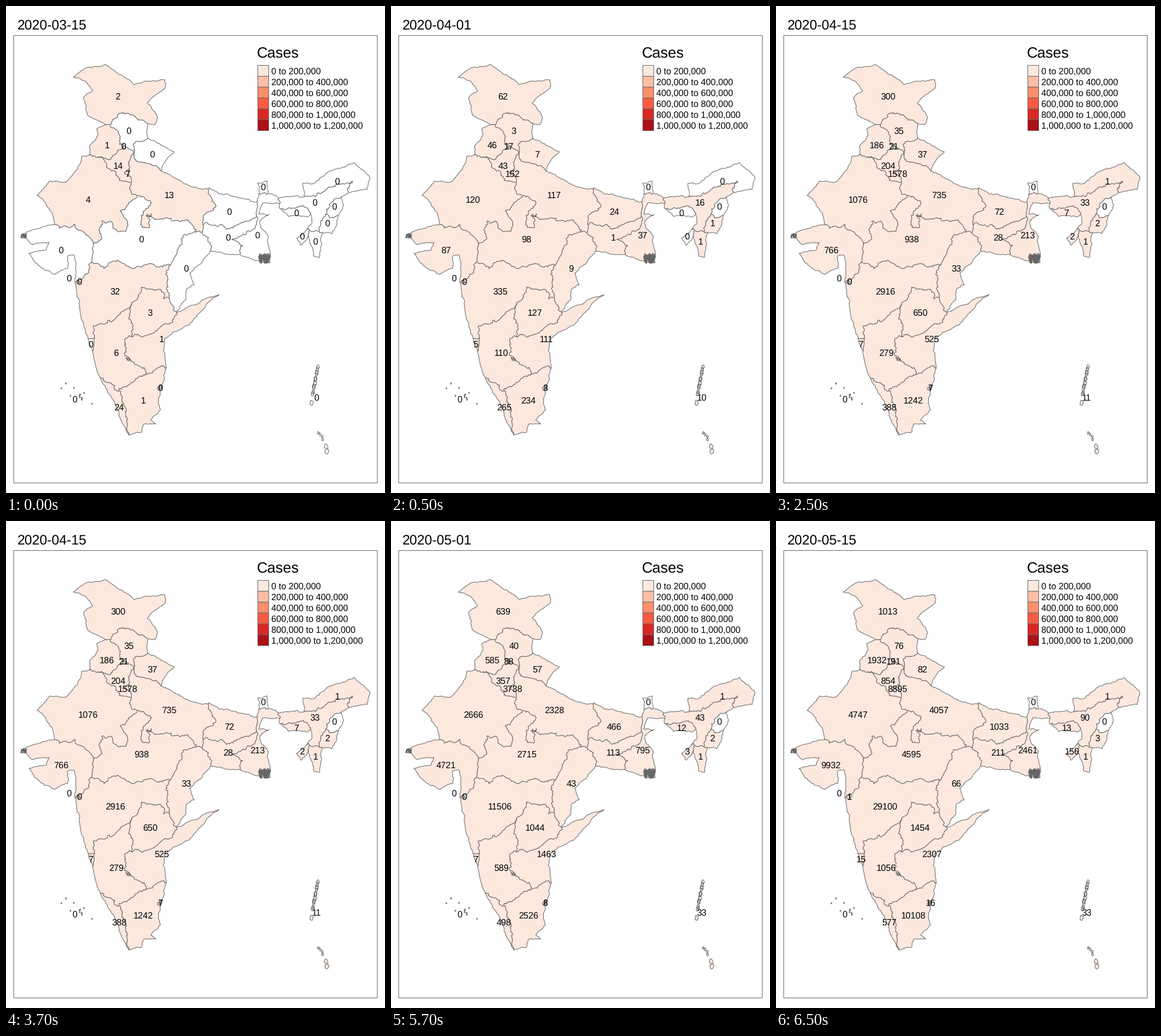
These frames come from a looping animation (660x849 px, 8000 ms). A matplotlib script:

```python
import numpy as np
import matplotlib.pyplot as plt
from matplotlib.animation import FuncAnimation
from matplotlib.patches import PathPatch, Rectangle
from matplotlib.path import Path

W, H, DPI = 660, 849, 64
PT = 72 / DPI
GREY = "#666666"
REDS = ["#FDE8DE", "#FCBFA6", "#FC8E6D", "#F75C41", "#DA2723", "#AA1016"]
DATES = [f"2020-{month:02}-{day:02}" for month in (3, 4, 5) for day in (1, 15)][1:]
STEP_OF_TICK = np.repeat(np.arange(5), [1, 4, 4, 4, 3])
rng = np.random.default_rng(7)

plt.rcParams.update({"font.family": "Liberation Sans", "text.hinting": "none"})
fig = plt.figure(figsize=(W / DPI, H / DPI), dpi=DPI, facecolor="white")
ax = fig.add_axes([0, 0, 1, 1])
ax.set(xlim=(0, W), ylim=(H, 0))
ax.axis("off")

arcs = []


def fractal(a, b, grit):
    """Split a segment at displaced midpoints until it looks like a natural border."""
    d = b - a
    size = np.hypot(*d)
    if size < 3.5:
        return [a]
    normal = np.array([-d[1], d[0]]) / size
    mid = (a + b) / 2 + normal * rng.normal(0, grit * (0.8 + 0.08 * size))
    return fractal(a, mid, grit) + fractal(mid, b, grit)


def arc(codes, *points):
    """Line through a few key points, bordering one or two regions."""
    grit = 0.85 if " " in codes else 0.4
    pts = np.array(points, float)
    line = sum((fractal(a, b, grit) for a, b in zip(pts, pts[1:])), [])
    arcs.append((codes.split(), np.array(line + [pts[-1]])))


def ring(code):
    """Stitch all border lines of a region into a closed outline."""
    parts = [p for codes, p in arcs if code in codes]
    line = parts.pop(0)
    while parts:
        options = [(np.abs(p[end] - line[-1]).sum(), i, end)
                   for i, p in enumerate(parts) for end in (0, -1)]
        _, i, end = min(options)
        p = parts.pop(i)
        line = np.vstack([line, (p[::-1] if end else p)[1:]])
    return closed(line)


def closed(pts):
    return Path(np.vstack([pts, pts[:1]]), closed=True)


def chain(start, end, n, size, spread):
    """Ragged islets strung between two points."""
    t = np.linspace(0, 2 * np.pi, 10, endpoint=False)
    circle = np.column_stack([0.7 * np.cos(t), np.sin(t)])
    centres = np.linspace(start, end, n) + rng.normal(0, spread, (n, 2))
    return [closed(c + circle * size * rng.uniform(0.3, 0.6, (10, 1))) for c in centres]


def scribble(x0, y0, x1, y1, n):
    """Dense tangle of coast lines."""
    xs = np.linspace(x0, x1, n) + rng.normal(0, 1, n)
    ax.plot(xs, rng.uniform(y0, y1, n), color=GREY, lw=PT, zorder=3)


def text(x, y, s, px, **kw):
    return ax.text(x, y, s, fontsize=px * PT, color="black", va="baseline", zorder=5, **kw)


def box(x, y, w, h, **kw):
    ax.add_patch(Rectangle((x, y), w, h, ec=GREY, lw=PT, snap=False, **kw))


# North
arc("JK", (175, 207), (143, 191), (135, 160), (151, 148), (138, 131), (117, 124), (143, 107),
    (173, 102), (199, 120), (223, 137), (245, 131), (277, 129), (277, 143), (246, 169), (264, 194),
    (259, 207), (247, 205))
arc("JK PB", (175, 207), (181, 207))
arc("JK HP", (247, 205), (222, 191), (194, 190), (181, 207))
arc("HP", (247, 205), (245, 217), (247, 230))
arc("HP UK", (247, 230), (225, 237), (223, 254))
arc("HP HR", (223, 254), (205, 243))
arc("HP PB", (205, 243), (199, 228), (181, 207))
arc("UK", (247, 230), (270, 243), (293, 254), (272, 280), (270, 288))
arc("UK UP", (270, 288), (249, 275), (224, 267), (223, 254))
arc("HR UP", (223, 254), (213, 272), (215, 283))
arc("DL UP", (215, 283), (216, 297))
arc("HR DL", (215, 283), (206, 290), (216, 297))
arc("HR UP", (216, 297), (218, 308))
arc("HR RJ", (218, 308), (197, 304), (190, 288), (173, 272), (160, 263))
arc("PB HR", (160, 263), (183, 267), (205, 243))
arc("PB RJ", (160, 263), (145, 260))
arc("PB", (145, 260), (146, 243), (160, 226), (158, 214), (175, 207))
arc("RJ", (145, 260), (132, 262), (125, 283), (103, 307), (76, 305), (54, 330), (75, 353), (85, 381))
arc("RJ UP", (218, 308), (219, 328), (229, 331))

# Centre
arc("RJ MP", (229, 331), (199, 357), (212, 379), (209, 393), (186, 387), (184, 376), (167, 375),
    (163, 388), (166, 407), (152, 415))
arc("RJ GJ", (152, 415), (137, 395), (120, 381), (85, 381))
arc("GJ", (85, 381), (55, 388), (30, 397), (46, 416), (75, 412), (70, 425), (40, 431), (60, 455),
    (85, 468), (107, 458), (107, 436), (118, 434), (121, 460), (121, 484))
arc("GJ MP", (152, 415), (152, 427), (148, 447))
arc("GJ MH", (148, 447), (143, 466), (121, 484))
arc("MP MH", (148, 447), (170, 458), (187, 445), (221, 458), (264, 455), (286, 452))
arc("MP UP", (229, 331), (253, 343), (236, 368), (237, 386), (249, 387), (244, 365), (277, 370),
    (317, 373), (331, 394))
arc("MP CG", (331, 394), (308, 400), (298, 428), (286, 452))
arc("MH CG", (286, 452), (281, 480), (284, 509))
arc("UP CG", (331, 394), (341, 395))
arc("UP JH", (341, 395), (343, 381))
arc("UP BR", (343, 381), (345, 364), (366, 349), (354, 317))
arc("UP", (354, 317), (325, 316), (299, 302), (270, 288))

# East
arc("BR", (354, 317), (372, 328), (408, 335), (437, 341))
arc("BR WB", (437, 341), (436, 367))
arc("BR JH", (436, 367), (410, 377), (397, 383), (370, 384), (343, 381))
arc("JH WB", (436, 367), (433, 388), (393, 407), (412, 418), (407, 433))
arc("JH", (407, 433), (385, 433), (357, 427))
arc("CG JH", (341, 395), (358, 418), (357, 427))
arc("CG", (357, 427), (343, 443), (320, 466), (328, 486), (315, 493), (313, 512), (297, 534))
arc("CG TG", (284, 509), (290, 522), (297, 534))
arc("WB", (437, 341), (441, 327))
arc("SK WB", (441, 327), (456, 327))
arc("SK", (441, 327), (438, 309), (455, 305), (456, 327))
arc("WB", (456, 327), (475, 335))
arc("WB AS", (475, 335), (477, 344))
arc("WB", (477, 344), (447, 343), (440, 362), (458, 364), (442, 374), (457, 402), (460, 447),
    (434, 444), (407, 433))
arc("AS", (475, 335), (519, 333))
arc("AS AR", (519, 333), (549, 327), (574, 312), (603, 305), (597, 325))
arc("AR", (519, 333), (517, 309), (537, 309), (561, 289), (591, 280), (607, 273), (633, 297),
    (629, 320), (597, 325))
arc("AS", (597, 325), (584, 333))
arc("AS NL", (584, 333), (563, 346), (557, 363))
arc("AS MN", (557, 363), (548, 377), (545, 393))
arc("AS MZ", (545, 393), (529, 391))
arc("AS TR", (529, 391), (524, 389))
arc("AS", (524, 389), (533, 377), (531, 361))
arc("AS ML", (531, 361), (518, 348), (476, 352))
arc("AS", (476, 352), (477, 344))
arc("ML", (476, 352), (492, 367), (525, 368), (531, 361))
arc("NL", (584, 333), (588, 347), (579, 365))
arc("NL MN", (579, 365), (557, 363))
arc("MN", (579, 365), (567, 397), (551, 395))
arc("MN MZ", (551, 395), (545, 393))
arc("MZ", (551, 395), (550, 415), (546, 438), (536, 436), (527, 400))
arc("MZ TR", (527, 400), (529, 391))
arc("TR", (527, 400), (514, 417), (506, 405), (524, 389))

# South
arc("TG MH", (284, 509), (275, 511), (268, 494), (236, 490), (219, 520))
arc("TG KA", (219, 520), (218, 550), (219, 577))
arc("TG AP", (219, 577), (246, 574), (290, 547), (297, 534))
arc("AP", (297, 534), (331, 521), (343, 512), (371, 503), (333, 539), (318, 557), (276, 580),
    (274, 600), (279, 631))
arc("AP KA", (219, 577), (207, 580), (206, 605), (217, 619), (240, 630), (243, 643))
arc("AP TN", (243, 643), (264, 631), (279, 631))
arc("TN", (279, 631), (268, 672), (269, 704), (252, 722), (261, 729), (240, 729), (234, 744), (214, 748))
arc("KA TN", (243, 643), (222, 655), (197, 671))
arc("KL TN", (197, 671), (206, 697), (214, 748))
arc("KL KA", (197, 671), (164, 648))
arc("KL", (164, 648), (186, 686), (199, 719), (214, 748))
arc("KA", (164, 648), (151, 602))
arc("GA KA", (151, 602), (154, 579))
arc("GA MH", (154, 579), (143, 580))
arc("GA", (143, 580), (151, 602))
arc("MH KA", (154, 579), (152, 558), (190, 546), (219, 520))
arc("MH", (143, 580), (130, 537), (123, 500), (121, 484))

islands = {
    "CH": chain((204, 243), (207, 246), 2, 6, 0.5),
    "DN": chain((126, 481), (129, 480), 2, 7, 0.5),
    "PY": chain((266, 667), (269, 664), 3, 6, 0.5),
    "LD": chain((104, 658), (146, 694), 11, 2.5, 7),
    "AN": chain((542, 629), (535, 676), 11, 8, 0.8) + chain((532, 692), (532, 692), 1, 9, 0)
          + chain((545, 743), (553, 754), 4, 5, 1) + chain((557, 768), (559, 776), 2, 9, 0),
}

# Label centre, then the count on each date; no counts means zero throughout
regions = {
    "JK": (195, 157, 2, 62, 300, 639, 1013), "HP": (214, 217, 0, 3, 35, 40, 76),
    "PB": (176, 242, 1, 46, 186, 585, 1932), "UK": (255, 258, 0, 7, 37, 57, 82),
    "HR": (195, 278, 14, 43, 204, 357, 854), "DL": (212, 292, 7, 152, 1578, 3738, 8895),
    "UP": (284, 329, 13, 117, 735, 2328, 4057), "RJ": (143, 337, 4, 120, 1076, 2666, 4747),
    "BR": (389, 358, 0, 24, 72, 466, 1033), "AR": (577, 305, 0, 0, 1, 1, 1),
    "MN": (560, 378, 0, 1, 2, 2, 3), "MZ": (539, 410, 0, 1, 1, 1, 1),
    "TR": (516, 401, 0, 0, 2, 3, 156), "ML": (506, 360, 0, 0, 7, 12, 13),
    "AS": (538, 342, 0, 16, 33, 43, 90), "WB": (438, 399, 0, 37, 213, 795, 2461),
    "JH": (387, 403, 0, 1, 28, 113, 211), "CG": (314, 457, 0, 9, 33, 43, 66),
    "MP": (236, 406, 0, 98, 938, 2715, 4595), "GJ": (96, 425, 0, 87, 766, 4721, 9932),
    "MH": (190, 497, 32, 335, 2916, 11506, 29100), "TG": (251, 534, 3, 127, 650, 1044, 1454),
    "AP": (271, 580, 1, 111, 525, 1463, 2307), "KA": (192, 604, 6, 110, 279, 589, 1056),
    "GA": (148, 589, 0, 5, 7, 7, 15), "KL": (197, 699, 24, 265, 388, 498, 577),
    "TN": (239, 687, 1, 234, 1242, 2526, 10108), "AN": (541, 682, 0, 10, 11, 33, 33),
    "CH": (205, 244, 0, 17, 21, 88, 191), "DN": (128, 480, 0, 0, 0, 0, 1),
    "PY": (269, 665, 0, 3, 7, 8, 16),
    "SK": (448, 315), "NL": (572, 349), "LD": (120, 685), "DD": (110, 474),
}

patches, labels = {}, {}
bordered = {code for codes, _ in arcs for code in codes}
for code, (x, y, *_) in regions.items():
    paths = [ring(code)] if code in bordered else islands.get(code)
    if paths:
        patches[code] = ax.add_patch(PathPatch(Path.make_compound_path(*paths), ec=GREY,
                                               lw=PT, joinstyle="round", zorder=2))
    labels[code] = text(x, y + 6, "", 15.5, ha="center")

scribble(441, 431, 459, 449, 130)
scribble(27, 396, 35, 405, 50)
scribble(246, 362, 253, 368, 14)
scribble(209, 611, 217, 619, 14)

# Frame, title and legend
box(13.5, 51.5, 633, 780, fill=False)
date = text(20, 42, "", 23.6)
text(437, 90, "Cases", 26)
for i, color in enumerate(REDS):
    top = 103.5 + 18.95 * i
    box(438.5, top, 19, 18.95, fc=color)
    text(462, round(top + 15.5), f"{200_000 * i:,} to {200_000 * (i + 1):,}", 15.5)


def update(tick):
    step = STEP_OF_TICK[tick]
    date.set_text(DATES[step])
    for code, (_, _, *counts) in regions.items():
        n = counts[step] if counts else 0
        labels[code].set_text(str(n))
        if code in patches:
            patches[code].set_facecolor(REDS[n // 200_000] if n else "white")
    return [date, *labels.values(), *patches.values()]


anim = FuncAnimation(fig, update, frames=len(STEP_OF_TICK), interval=500, repeat=True, repeat_delay=0)
plt.show()
```
